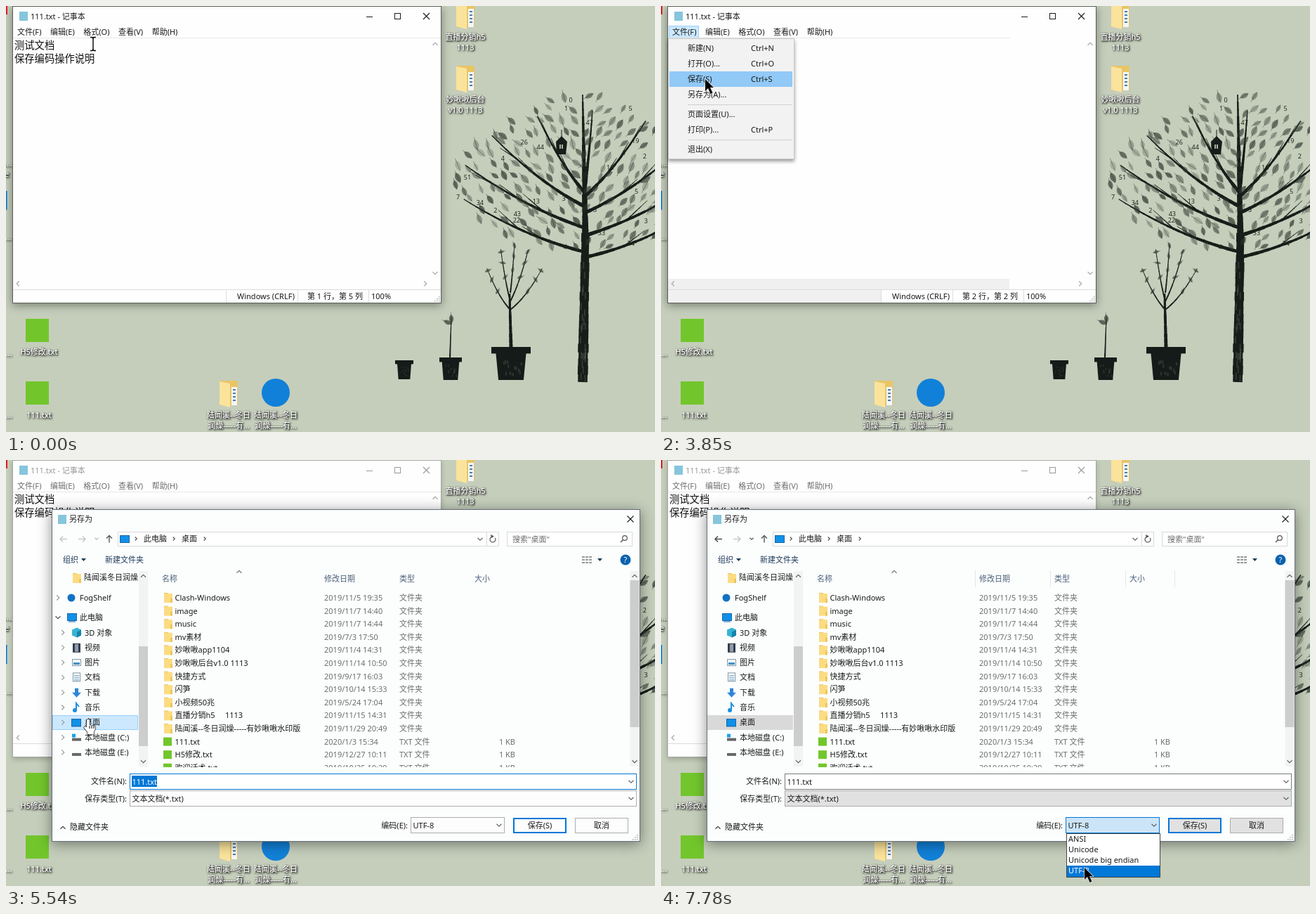
These frames come from a looping animation (924x606 px, 8 s). An HTML page with a canvas:

```html
<!DOCTYPE html>
<html lang="zh-CN">
<head>
<meta charset="utf-8">
<title>另存为</title>
<style>
html, body { margin: 0; width: 100%; height: 100%; overflow: hidden; background: #c5cebb; }
canvas { display: block; }
</style>
</head>
<body>
<canvas id="stage" width="924" height="606"></canvas>
<script>
const stage = document.getElementById('stage');
const wall = document.createElement('canvas');
wall.width = 924; wall.height = 606;
let c = wall.getContext('2d');
const FONT = '"Noto Sans", "Noto Sans CJK SC", "Noto Sans CJK", sans-serif';
const BLUE = '#0078d7', GREY = '#6d6d6d', INK = '#1a1a1a', GREEN = '#72c62c', BARK = '#171d19';

// Drawing helpers
function text(s, x, y, color = INK, size = 11, align = 'left') {
  c.font = `${size}px ${FONT}`;
  c.textAlign = align;
  c.fillStyle = color;
  c.fillText(s, x, y + size * 0.37);
}
function fill(x, y, w, h, color) {
  c.fillStyle = color;
  c.fillRect(x, y, w, h);
}
function box(x, y, w, h, bg, edge, lw = 1) {
  fill(x, y, w, h, bg);
  c.strokeStyle = edge;
  c.lineWidth = lw;
  c.strokeRect(x + lw / 2, y + lw / 2, w - lw, h - lw);
}
function line(color, lw, ...p) {
  c.strokeStyle = color;
  c.lineWidth = lw;
  c.beginPath();
  for (let i = 0; i < p.length; i += 2) c.lineTo(p[i], p[i + 1]);
  c.stroke();
}
function poly(color, ...p) {
  c.fillStyle = color;
  c.beginPath();
  for (let i = 0; i < p.length; i += 2) c.lineTo(p[i], p[i + 1]);
  c.fill();
}
function disc(x, y, r, color) {
  c.fillStyle = color;
  c.beginPath();
  c.arc(x, y, r, 0, 7);
  c.fill();
}
function ring(x, y, r, from = 0, to = 7) {
  c.strokeStyle = '#555';
  c.lineWidth = 1.2;
  c.beginPath();
  c.arc(x, y, r, from, to);
  c.stroke();
}
function turned(x, y, angle, draw) {
  c.save();
  c.translate(x, y);
  c.rotate(angle);
  draw();
  c.restore();
}
const TURN = { right: 0, down: Math.PI / 2, left: Math.PI, up: -Math.PI / 2 };
function chevron(x, y, dir, color = '#666', s = 3.5) {
  turned(x, y, TURN[dir], () => line(color, 1.2, -s / 2, -s, s / 2, 0, -s / 2, s));
}
function arrow(x, dir, color) {
  turned(x, 112.5, TURN[dir], () => {
    line(color, 1.4, -5, 0, 5, 0);
    line(color, 1.4, 1, -4, 5, 0, 1, 4);
  });
}
function triangle(x, y) {
  poly('#1e395b', x - 3.5, y - 2, x + 3.5, y - 2, x, y + 2);
}
function cross(x, y, color) {
  for (const d of [-4.5, 4.5]) line(color, 1.1, x - d, y - 4.5, x + d, y + 4.5);
}
function shadowed(blur, alpha, draw) {
  c.save();
  c.shadowColor = `rgba(0,0,0,${alpha})`;
  c.shadowBlur = blur;
  c.shadowOffsetY = 3;
  draw();
  c.restore();
}
function grip(x, y) {
  for (let i = 0; i < 3; i++)
    for (let j = 0; j <= i; j++) fill(x + 3 * i, y + 3 * (2 - j), 1.5, 1.5, '#aaa');
}

// Wallpaper
let seed = 11;
const rnd = () => (seed = seed * 16807 % 2147483647) / 2147483647;
const mix = (a, b, k) => a + (b - a) * k;

// A tapering branch that bows upwards; returns a lookup for points along it.
function limb(w0, w1, x0, y0, x1, y1, bow = 0) {
  const at = k => [mix(x0, x1, k), mix(y0, y1, k) - bow * 4 * k * (1 - k)];
  for (let k = 0; k < 1; k += .05)
    line(BARK, mix(w0, w1, k) * (.9 + rnd() * .2), ...at(k), ...at(k + .06));
  return at;
}
function leaf(x, y, angle, len, alpha) {
  turned(x, y, angle, () => {
    c.beginPath();
    c.moveTo(-len / 2, 0);
    c.quadraticCurveTo(0, -len * .5, len / 2, 0);
    c.quadraticCurveTo(0, len * .5, -len / 2, 0);
    c.fillStyle = `rgba(48,57,48,${alpha})`;
    c.fill();
    line('rgba(30,38,32,.5)', .7, -len * .7, 0, len / 2, 0);
  });
}
function pot(x, y, w, h) {
  fill(x, y, w, h * .2, '#151b19');
  poly('#151b19', x + w * .1, y, x + w * .9, y, x + w * .82, y + h, x + w * .18, y + h);
  for (let i = 0; i < 12; i++)
    fill(x + w * (.25 + rnd() * .5), y + h * (.3 + rnd() * .5), w / 25, h / 10, 'rgba(90,100,92,.35)');
}
function inCrown(x, y) {
  const p = y < 235 ? 1.4 : 2;
  return Math.abs((x - 822) / 190) ** p + Math.abs((y - 235) / 113) ** p < 1;
}
function bigTree() {
  limb(15, 11, 821, 535, 825, 325);
  limb(9, 1.5, 825, 330, 821, 128, -1);
  for (let i = 0; i < 25; i++)
    fill(817 + rnd() * 7, 360 + rnd() * 165, 2, 10, 'rgba(110,120,110,.3)');

  // Main limbs fan out, each with a few twigs
  for (let i = 0; i < 9; i++) {
    const a = mix(-.35, Math.PI + .2, i / 8), up = Math.sin(a);
    const at = limb(5, 1.2, 824, 335 - 75 * Math.max(up, -.3), 822 + 172 * Math.cos(a), 255 - 105 * up, -8);
    for (let k = .35; k < .8; k += .2) {
      const [x, y] = at(k);
      limb(1.6, .7, x, y, x + 30 * Math.cos(a), y - 14 - 14 * rnd());
    }
  }
  for (let y = 126; y < 350; y += 16)
    for (let x = 634; x < 926; x += 17) {
      const lx = x + rnd() * 12, ly = y + rnd() * 11;
      const tilt = (lx < 822 ? .95 : -.85) + (rnd() - .5) * .8;
      const len = 12 + rnd() * 5, alpha = .2 + rnd() * .5;
      if (!inCrown(lx, ly)) continue;
      if (rnd() < .12) text(Math.floor(rnd() * rnd() * 60), lx, ly, '#20271f', 9, 'center');
      else leaf(lx, ly, tilt, len, alpha);
    }
  // Birdhouse
  line(BARK, 1, 791, 176, 791, 188);
  poly(BARK, 784, 211, 783, 193, 791, 185, 799, 193, 797, 211);
  fill(788, 197, 5, 6, '#a9b3a2');
  line(BARK, 1, 790.5, 197, 790.5, 203);
}
function sapling() {
  limb(5, 2.5, 719, 486, 717, 410, 0);
  for (let i = -2; i <= 2; i++) {
    const at = limb(2, .8, 718, 408 + 12 * Math.abs(i), 724 + 19.5 * i, 338 + 9 * i * i, -6);
    for (const k of [.55, .8, .97]) leaf(...at(k), rnd() * 3, 9, .55);
  }
  pot(691, 485, 56, 47);
}
function seedling() {
  limb(2, 1, 632, 501, 634, 443, 0);
  leaf(629, 450, .4, 13, .65);
  leaf(634, 445, 1.5, 13, .65);
  pot(617, 500, 32, 32);
  pot(554, 504, 26, 27);
}

// Desktop icons
function label(x, y, ...rows) {
  c.save();
  c.shadowColor = '#000';
  c.shadowBlur = 3;
  c.shadowOffsetX = c.shadowOffsetY = 1;
  rows.forEach((s, i) => { for (let k = 0; k < 2; k++) text(s, x, y + 15 * i, '#fff', 11, 'center'); });
  c.restore();
}
function bigFolder(x, y) {
  fill(x, y + 1, 26, 35, '#e9c566');
  poly('#fbe39b', x, y + 2, x + 15, y + 5, x + 15, y + 39, x, y + 35);
  fill(x + 17, y + 10, 8, 26, '#f4f6f8');
  for (let i = 0; i < 4; i++) fill(x + 19, y + 13 + 5 * i, 4, 2, '#4b7fae');
}
function desktop() {
  fill(0, 0, 924, 606, '#c5cebb');
  bigTree();
  sapling();
  seedling();
  fill(0, 0, 2, 12, '#e31b23');
  fill(28, 0, 39, 2, '#e31b23');
  fill(543, 0, 59, 2, '#0a64ad');
  fill(0, 263, 1.5, 27, BLUE);
  label(1, 224, 's....', 'e');
  for (const y of [329, 494, 582]) label(4, y, '...');
  bigFolder(641, -6);
  label(654, 44, '直播分销h5', '1113');
  bigFolder(641, 84);
  label(654, 133, '妙啾啾后台', 'v1.0 1113');
  fill(28, 445, 33, 33, GREEN);
  label(47, 492, 'H5修改.txt');
  fill(28, 534, 33, 33, GREEN);
  label(47, 582, '111.txt');
  bigFolder(304, 532);
  disc(384, 550, 20, '#1180d8');
  for (const x of [317, 384]) label(x, 582, '陆闻溪--冬日', '润燥-----有...');
}

// Moments when the state changes, in ms
const AT = { firstClick: 560, caretMoved: 950, menu: 3420, inactive: 4430, dialog: 4840, settling: 4970, ready: 5110,
  placeClicked: 5680, typeHover: 6390, typeLeft: 6830, dropdown: 6960 };

// Notepad
function notepad(q) {
  const active = q < AT.inactive, dull = q >= AT.firstClick && active;
  shadowed(active ? 12 : 7, active ? .4 : .2, () => fill(9, 0, 611, 423, '#fff'));
  box(9, 0, 611, 423, '#fefefe', active ? '#5a5f58' : '#a3a8a0');
  fill(19, 8, 12, 13, '#86c5dc');
  const ink = active ? INK : '#999';
  text('111.txt - 记事本', 35, 14.5, ink);
  line(ink, 1, 513, 15.5, 522, 15.5);
  c.strokeRect(553.5, 10.5, 8, 8);
  cross(598.5, 14.5, ink);
  if (q >= AT.menu && active) box(11, 28, 43, 18, '#cce8ff', '#99d1ff');
  let x = 16;
  for (const s of ['文件(F)', '编辑(E)', '格式(O)', '查看(V)', '帮助(H)']) {
    text(s, x, 37, active ? INK : GREY);
    x += c.measureText(s).width + 12.5;
  }
  line('#e8e8e8', 1, 10, 45.5, dull ? 496 : 619, 45.5);
  text('测试文档', 12, 56, '#111', 14.3);
  text('保存编码操作说明', 12, 75, '#111', 14.3);
  if (dull) {
    fill(10, 388, 486, 15, '#f0f0f0');
    fill(10, 404, 303, 18, '#f0f0f0');
  }
  const dim = '#a8a8a8';
  chevron(611, 54, 'up', dim);
  chevron(611, 380, 'down', dim);
  chevron(17, 395, 'left', dim);
  chevron(597, 395, 'right', dim);
  line('#dcdcdc', 1, 10, 403.5, 619, 403.5);
  for (const x of [313.5, 415.5, 516.5]) line('#dcdcdc', 1, x, 404, x, 422);
  const [row, col] = q < AT.caretMoved ? [1, 5] : [2, 2];
  text('Windows (CRLF)', 329, 413);
  text(`第 ${row} 行，第 ${col} 列`, 429, 413);
  text('100%', 520, 413);
  grip(610, 413);
  if (dull && q % 1060 >= 530) fill(12 + 14.3 * (col - 1), 29 + 19 * row, 1, 16, '#000');
}
function fileMenu(mouseY) {
  shadowed(5, .4, () => fill(10, 46, 180, 172, '#f2f2f2'));
  box(10, 46, 180, 172, '#f2f2f2', '#ccc');
  let top = 49;
  for (const item of ['新建(N)|Ctrl+N', '打开(O)...|Ctrl+O', '保存(S)|Ctrl+S', '另存为(A)...|', '-',
    '页面设置(U)...|', '打印(P)...|Ctrl+P', '-', '退出(X)|']) {
    if (item === '-') {
      line('#d0d0d0', 1, 38, top + 3.5, 187, top + 3.5);
      top += 6;
      continue;
    }
    if (mouseY >= top && mouseY < top + 22) fill(12, top, 175, 22, '#91c9f7');
    const [name, key] = item.split('|');
    text(name, 38, top + 11);
    text(key, 128, top + 11);
    top += 22;
  }
}

// Save dialog
const files = `Clash-Windows|2019/11/5 19:35
image|2019/11/7 14:40
music|2019/11/7 14:44
mv素材|2019/7/3 17:50
妙啾啾app1104|2019/11/4 14:31
妙啾啾后台v1.0 1113|2019/11/14 10:50
快捷方式|2019/9/17 16:03
闪笋|2019/10/14 15:33
小视频50兆|2019/5/24 17:04
直播分销h5     1113|2019/11/15 14:31
陆闻溪--冬日润燥-----有妙啾啾水印版|2019/11/29 20:49
111.txt|2020/1/3 15:34
H5修改.txt|2019/12/27 10:11
欢迎话术.txt|2019/10/25 10:29`.split('\n').map(s => s.split('|'));

function folder(x, y) {
  fill(x, y - 7, 6, 4, '#eec65c');
  fill(x, y - 6, 12, 13, '#fbdc82');
  fill(x + 9, y + 1, 3, 6, '#eec65c');
}
function monitor(x, y) {
  box(x, y - 5, 14, 11, '#1090e8', '#1767a8');
}
function drive(x, y) {
  fill(x, y + 1, 13, 4, '#666');
}
// Each place has a name and an icon drawn from its left edge x and middle y
const places = {
  '3D 对象'(x, y) {
    poly('#35b4d6', x, y - 4, x + 7, y - 7, x + 13, y - 4, x + 13, y + 4, x + 7, y + 7, x, y + 4);
    poly('#1784a8', x + 7, y - 1, x + 13, y - 4, x + 13, y + 4, x + 7, y + 7);
  },
  '视频'(x, y) {
    fill(x + 1, y - 6, 11, 13, '#333c4a');
    fill(x + 4, y - 5, 5, 11, '#8f9bb0');
  },
  '图片'(x, y) {
    box(x, y - 5, 13, 10, '#eef6fb', '#8a9aa5');
    fill(x + 2, y, 9, 3, '#3c8fc0');
  },
  '文档'(x, y) {
    box(x + 1, y - 7, 11, 13, '#fff', '#7f93a0');
    for (const d of [-3, 0, 3]) fill(x + 3, y + d, 7, 1, '#4a90c0');
  },
  '下载'(x, y) {
    fill(x + 4, y - 6, 5, 7, '#2f86d6');
    poly('#2f86d6', x, y, x + 13, y, x + 6.5, y + 7);
  },
  '音乐'(x, y) {
    disc(x + 4, y + 4, 3, '#1c8fe0');
    line('#1c8fe0', 2, x + 6, y + 4, x + 6, y - 6, x + 10, y - 1);
  },
  '桌面': (x, y) => monitor(x - 1, y),
  '本地磁盘 (C:)'(x, y) {
    drive(x, y);
    fill(x, y - 5, 5, 5, '#1aa0ee');
  },
  '本地磁盘 (E:)': drive,
};

function scrollbar(x, top, height) {
  fill(x, 158, 13, 278, '#f3f3f3');
  chevron(x + 6.5, 165, 'up');
  fill(x, top, 13, height, '#cdcdcd');
  chevron(x + 6.5, 429, 'down');
}
function combo(x, y, w, value, bg, edge) {
  box(x, y, w, 23, bg, edge);
  text(value, x + 3.5, y + 11.5);
  chevron(x + w - 8, y + 11.5, 'down');
}
function button(x, name, bg, edge, lw) {
  box(x, 509, 76, 22, bg, edge, lw);
  text(name, x + 38, 519.5, INK, 11, 'center');
}
function addressBar(early, clicked) {
  if (!early) {
    arrow(82, 'left', clicked ? '#444' : '#c4c4c4');
    arrow(108, 'right', '#c4c4c4');
    chevron(129, 112, 'down', clicked ? '#555' : '#bbb', 2.5);
    box(159, 102, 543, 21, '#fff', '#d9d9d9');
    box(713, 102, 179, 21, '#fff', '#d9d9d9');
    text('组织', 81, 142, '#1e395b');
    text('新建文件夹', 141, 142, '#1e395b');
    triangle(110.5, 142);
    triangle(845.5, 142);
    for (let i = 0; i < 9; i++) fill(820 + 5 * (i % 3), 137 + 4 * Math.floor(i / 3), 4, 2, '#999');
    chevron(283, 112, 'right', '#555', 2.5);
  }
  arrow(147, 'up', '#555');
  monitor(162, 112);
  chevron(185, 112, 'right', '#555', 2.5);
  text('此电脑', 196, 112);
  chevron(239, 112, 'right', '#555', 2.5);
  text('桌面', 250, 112);
  chevron(675, 112.5, 'down');
  const x = early ? 712.5 : 684.5;
  line('#d9d9d9', 1, x, 103, x, 122);
  ring(693, 113, 4, -.6, 4.4);
  poly('#555', 690, 106, 695, 108.5, 691, 111);
  text('搜索"桌面"', 721, 112.5, GREY);
  ring(881, 111, 3.3);
  line('#555', 1.5, 878.5, 113.5, 875, 117);
  disc(882, 142, 7.5, '#0b62ad');
  text('?', 882, 142, '#fff', 11, 'center');
}
function placeTree(early, clicked, late) {
  const expanders = !early && !late;
  folder(95, 168);
  text('陆闻溪冬日润燥', 111, 167);
  disc(93, 196, 5.5, '#1272c4');
  text('FogShelf', 105, 196);
  monitor(87, 223);
  line('#1767a8', 1, 89, 230, 99, 230);
  text('此电脑', 105, 224);
  if (expanders) {
    chevron(74, 196, 'right', '#999');
    chevron(74, 224, 'down', '#555');
  }
  Object.entries(places).forEach(([name, icon], i) => {
    const y = 245.5 + 21.3 * i;
    if (name === '桌面') {
      const bg = expanders ? '#cce8ff' : '#d9d9d9';
      box(66, 363, 122, 21, bg, expanders && !clicked ? '#99d1ff' : bg);
    }
    icon(94, y);
    text(name, 112, y);
    if (expanders) chevron(81, y, 'right', '#999');
  });
  scrollbar(189, 265, 142);
}
function fileList(clicked) {
  const cols = { 名称: 222, 修改日期: 453, 类型: 560, 大小: 667 };
  for (const [name, x] of Object.entries(cols)) {
    text(name, x, 169, '#4c607a');
    if (clicked) fill(x > 222 ? x - 6 : 731, 157, 1, 24, '#e5e5e5');
  }
  chevron(332, 159, 'up', '#777');
  c.save();
  c.beginPath();
  c.rect(204, 180, 685, 257);
  c.clip();
  files.forEach(([name, date], i) => {
    const y = 196 + 18.6 * i, isText = name.endsWith('.txt');
    if (isText) fill(224, y - 6, 12, 12, GREEN); else folder(225, y);
    text(name, 240.5, y);
    text(date, cols.修改日期, y, GREY);
    text(isText ? 'TXT 文件' : '文件夹', cols.类型, y, GREY);
    if (isText) text('1 KB', 725, y, GREY, 11, 'right');
  });
  c.restore();
  scrollbar(888.5, 171, 209);
}
function dropdown(mouseY) {
  box(577, 531, 134, 63, '#fff', '#444');
  const pick = mouseY < 531 ? 3 : Math.min(3, Math.floor((mouseY - 531) / 15));
  ['ANSI', 'Unicode', 'Unicode big endian', 'UTF-8'].forEach((s, i) => {
    if (i === pick) fill(578, 532 + 15 * i, 132, 16, BLUE);
    text(s, 580, 539 + 15 * i, i === pick ? '#fff' : INK);
  });
}
function dialog(q, mouseY) {
  const early = q < AT.ready, clicked = q >= AT.placeClicked, late = q >= AT.typeLeft;
  const hover = q >= AT.typeHover && !late, open = q >= AT.dropdown;
  c.save();
  if (early) {
    const k = q < AT.settling ? .96 : .9975;
    c.globalAlpha = q < AT.settling ? .6 : 1;
    c.translate(484 * (1 - k), 306.5 * (1 - k));
    c.scale(k, k);
  }
  shadowed(18, .45, () => fill(65, 70, 838, 473, '#fff'));
  box(65, 70, 838, 473, early ? '#fafafa' : '#fcfdfd', '#66707a');
  if (hover) fill(176, 493, 726, 49, '#f0f0f0');
  fill(74, 78, 12, 13, '#86c5dc');
  text('另存为', 90, 84);
  cross(889, 84, INK);
  addressBar(early, clicked);
  placeTree(early, clicked, late);
  fileList(clicked);

  const face = early || clicked ? '#e1e1e1' : '#fdfdfd';
  text('文件名(N):', 172, 457, INK, 11, 'right');
  combo(176, 446, 722, '111.txt', '#fff', clicked ? '#7a7a7a' : BLUE);
  if (!clicked) {
    fill(179, 449, 36, 16, BLUE);
    text('111.txt', 179.5, 457.5, '#fff');
  }
  text('保存类型(T):', 172, 481.5, INK, 11, 'right');
  combo(176, 470, 722, '文本文档(*.txt)', hover ? '#e5f1fb' : face, hover ? BLUE : '#adadad');
  chevron(81, 523, 'up', '#444');
  text('隐藏文件夹', 91, 522);
  text('编码(E):', 572, 519.5, INK, 11, 'right');
  combo(576, 508, 134, 'UTF-8', open ? '#cce4f7' : face, open ? BLUE : '#adadad');
  button(722, '保存(S)', face, BLUE, 2);
  button(810, '取消', face, '#adadad', 1);
  grip(892, 533);
  if (open) dropdown(mouseY);
  c.restore();
}

// Pointer: time and place of each stop
const stops = [[420, 124, 54], [1490, 12, 76], [2770, 34, 92], [3420, 26, 40], [4000, 90, 150], [4160, 87, 118],
  [4720, 87, 118], [4985, 188, 172], [5538, 117, 369], [6500, 605, 515], [7750, 603, 580]];
function pointerAt(q) {
  const i = stops.findIndex(s => s[0] > q);
  const [t1, x1, y1] = stops.at(i);
  const [t0, x0, y0] = stops[i - 1] || stops.at(i);
  if (t0 === t1 || i < 0) return [x1, y1];
  const u = (q - t0) / (t1 - t0), k = u * u * (3 - 2 * u);
  return [Math.round(mix(x0, x1, k)), Math.round(mix(y0, y1, k))];
}
const arrowShape = new Path2D('M0 0V17L4 13L7.5 21L10.5 19.5L7 12H12Z');
const handShape = new Path2D('M-2 1Q0 -2 2 1V8L9 9Q11 10 10 14L8 18V21H-1V18L-6 12Q-6 9 -2 11Z');
function pointer(q, x, y) {
  c.save();
  c.translate(x, y);
  if (q < 3280) {
    line('#000', 1.4, 0, -8, 0, 8);
    for (const s of [-1, 1]) line('#000', 1.4, -4, 9.5 * s, -1, 9.5 * s, 0, 8 * s, 1, 9.5 * s, 4, 9.5 * s);
  } else {
    const hand = q >= AT.settling && q < 5800;
    const shape = hand ? handShape : arrowShape;
    c.lineWidth = 1.2;
    c.strokeStyle = hand ? '#000' : '#fff';
    c.fillStyle = hand ? '#fff' : '#000';
    c.stroke(shape);
    c.fill(shape);
    if (hand) for (const k of [2, 5, 8]) line('#000', 1, k, 9, k, 13);
  }
  c.restore();
}

// The screen refreshes at a steady, slow rate
const REFRESH = 138.3;
desktop();
c = stage.getContext('2d');
const start = performance.now();
function frame() {
  const t = (performance.now() - start) % 8000;
  const q = t < AT.firstClick ? 0 : AT.firstClick + REFRESH * Math.floor((t - AT.firstClick) / REFRESH);
  const [x, y] = pointerAt(q);
  c.drawImage(wall, 0, 0);
  notepad(q);
  if (q >= AT.menu && q < AT.inactive) fileMenu(y);
  if (q >= AT.dialog) dialog(q, y);
  pointer(q, x, y);
  requestAnimationFrame(frame);
}
frame();
</script>
</body>
</html>
```
